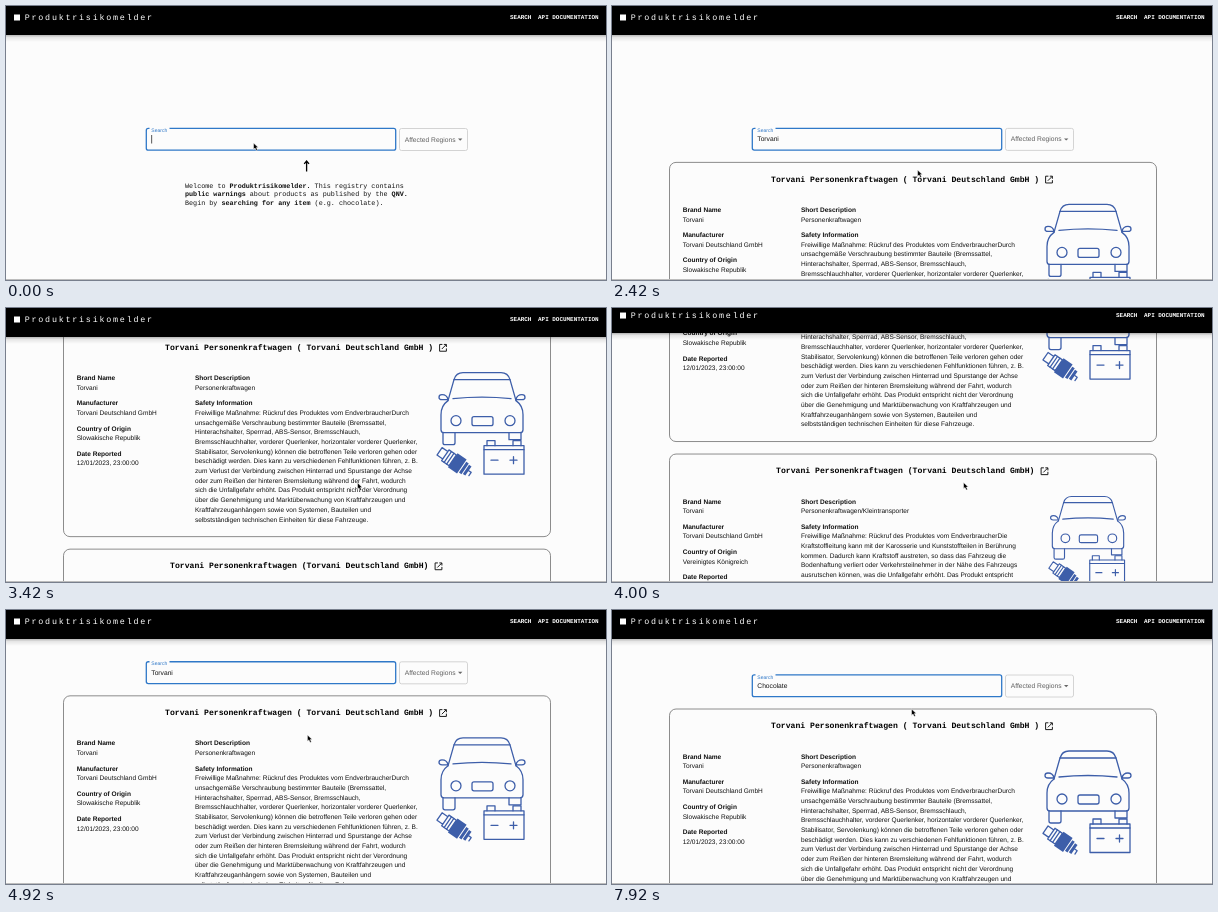
These frames come from a looping animation (600x274 px, 8 s). An HTML page with a canvas:

```html
<!DOCTYPE html>
<html lang="en">
<head>
<meta charset="utf-8">
<title>Produktrisikomelder</title>
<style>
html, body { margin: 0; width: 100%; height: 100%; overflow: hidden; background: #fcfcfc; }
canvas { display: block; width: 600px; height: 274px; }
</style>
</head>
<body>
<canvas id="stage"></canvas>
<script>
const W = 600, H = 274, LOOP = 8000;
const SANS = '"Liberation Sans", Arial, sans-serif';
const MONO = '"Liberation Mono", "Courier New", monospace';
const BLUE = '#2f78c8', INK = '#3d5ea9', BG = '#fcfcfc';
const BRAND = 'Torvani', SITE = 'Produktrisikomelder';
const RESULTS_AT = 2400, MAX_SCROLL = 225;

const canvas = document.getElementById('stage');
const dpr = window.devicePixelRatio || 1;
canvas.width = W * dpr;
canvas.height = H * dpr;
const ctx = canvas.getContext('2d');

const cards = [
  {
    title: `${BRAND} Personenkraftwagen ( ${BRAND} Deutschland GmbH )`,
    x: 159, iconX: 432.5, carScale: 1, carY: 42,
    kind: 'Personenkraftwagen', country: 'Slowakische Republik',
    lines: [
      'Freiwillige Maßnahme: Rückruf des Produktes vom EndverbraucherDurch',
      'unsachgemäße Verschraubung bestimmter Bauteile (Bremssattel,',
      'Hinterachshalter, Sperrrad, ABS-Sensor, Bremsschlauch,',
      'Bremsschlauchhalter, vorderer Querlenker, horizontaler vorderer Querlenker,',
      'Stabilisator, Servolenkung) können die betroffenen Teile verloren gehen oder',
      'beschädigt werden. Dies kann zu verschiedenen Fehlfunktionen führen, z. B.',
      'zum Verlust der Verbindung zwischen Hinterrad und Spurstange der Achse',
      'oder zum Reißen der hinteren Bremsleitung während der Fahrt, wodurch',
      'sich die Unfallgefahr erhöht. Das Produkt entspricht nicht der Verordnung',
      'über die Genehmigung und Marktüberwachung von Kraftfahrzeugen und',
      'Kraftfahrzeuganhängern sowie von Systemen, Bauteilen und',
      'selbstständigen technischen Einheiten für diese Fahrzeuge.'
    ]
  },
  {
    title: `${BRAND} Personenkraftwagen (${BRAND} Deutschland GmbH)`,
    x: 164, iconX: 428, carScale: 0.87, carY: 42.5,
    kind: 'Personenkraftwagen/Kleintransporter', country: 'Vereinigtes Königreich',
    lines: [
      'Freiwillige Maßnahme: Rückruf des Produktes vom EndverbraucherDie',
      'Kraftstoffleitung kann mit der Karosserie und Kunststoffteilen in Berührung',
      'kommen. Dadurch kann Kraftstoff austreten, so dass das Fahrzeug die',
      'Bodenhaftung verliert oder Verkehrsteilnehmer in der Nähe des Fahrzeugs',
      'ausrutschen können, was die Unfallgefahr erhöht. Das Produkt entspricht'
    ]
  }
];

// [time, value of the search field]
const typing = [[-80, '']];
[[1000, 1], [1330, 2], [1420, 4], [1500, 5], [1670, 7]]
  .forEach(([t, n]) => typing.push([t, BRAND.slice(0, n)]));
for (let n = 6; n >= 0; n--) typing.push([5410 + (6 - n) * 84, BRAND.slice(0, n)]);
[6300, 6620, 6780, 6900, 7000, 7100, 7200, 7300, 7400]
  .forEach((t, i) => typing.push([t, 'Chocolate'.slice(0, i + 1)]));

// [time, page offset]
const scroll = [[2420, 0], [2900, 57.5], [3230, 57.5], [3420, 133.5], [3600, 200],
  [3750, 228], [3850, 232], [4000, 229], [4120, 225], [4250, 218], [4500, 186.5],
  [4750, 110], [4950, 64], [5080, 57.5]];

// visible stretches of the pointer: [time, x, y]
const pointer = [
  [[0, 248, 137], [950, 248, 137]],
  [[2000, 248, 137], [2170, 292, 158], [2420, 306, 164], [2800, 330, 170], [3200, 352, 175],
   [4700, 352, 174], [5150, 250, 74], [5400, 248, 76]],
  [[7660, 248, 76], [7840, 294, 96], [7920, 300, 99], [8000, 300, 99]]
];

function track(keys, t, i = 1) {
  if (t <= keys[0][0]) return keys[0][i];
  for (let k = 1; k < keys.length; k++) {
    const a = keys[k - 1], b = keys[k];
    if (t < b[0]) return a[i] + (b[i] - a[i]) * (t - a[0]) / (b[0] - a[0]);
  }
  return keys[keys.length - 1][i];
}

function text(str, x, y, size, { font = SANS, bold = false, color = '#111', gap = 0 } = {}) {
  ctx.font = `${bold ? 'bold ' : ''}${size}px ${font}`;
  ctx.letterSpacing = gap + 'px';
  ctx.fillStyle = color;
  ctx.fillText(str, x, y);
  return x + ctx.measureText(str).width;
}

function box(x, y, w, h, r, color, width) {
  ctx.beginPath();
  ctx.roundRect(x, y, w, h, r);
  ctx.strokeStyle = color;
  ctx.lineWidth = width;
  ctx.stroke();
}

function shape(d, { fill, stroke, width = 1 }) {
  const p = new Path2D(d);
  if (fill) { ctx.fillStyle = fill; ctx.fill(p); }
  if (stroke) { ctx.strokeStyle = stroke; ctx.lineWidth = width; ctx.stroke(p); }
}

function header(y) {
  const shade = ctx.createLinearGradient(0, y + 29, 0, y + 36);
  shade.addColorStop(0, 'rgba(0,0,0,.28)');
  shade.addColorStop(0.35, 'rgba(0,0,0,.09)');
  shade.addColorStop(1, 'rgba(0,0,0,0)');
  ctx.fillStyle = shade;
  ctx.fillRect(0, y + 29, W, 7);
  ctx.fillStyle = '#000';
  ctx.fillRect(0, 0, W, y + 29);
  ctx.fillStyle = '#fff';
  ctx.fillRect(8, y + 8.5, 6, 6);
  text(SITE, 18.7, y + 14, 8.4, { font: MONO, color: '#fff', gap: 1.77 });
  const menu = { font: MONO, bold: true, color: '#fff' };
  text('SEARCH', 504, y + 13.4, 5.95, menu);
  text('API DOCUMENTATION', 532, y + 13.4, 5.95, menu);
}

function search(y, value, caret) {
  box(140.3, y + 122.4, 249.4, 21.8, 2, BLUE, 1.3);
  ctx.fillStyle = BG;
  ctx.fillRect(143.5, y + 121, 20, 3);
  text('Search', 145.3, y + 126, 5.05, { color: BLUE });
  const end = text(value, 145.3, y + 135.6, 6.7);
  if (caret) {
    ctx.fillStyle = '#111';
    ctx.fillRect(end + 0.1, y + 129, 0.7, 8.5);
  }
  box(393.5, y + 122.5, 68, 22, 2, '#c9c9c9', 0.8);
  text('Affected Regions', 398.8, y + 135.6, 6.7, { color: '#5f5f5f' });
  shape(`M452 ${y + 132.5}h4.4l-2.2 2.2z`, { fill: '#666' });
}

function welcome() {
  shape('M300.6 165.5V155.2M298.2 157.8L300.6 155L303 157.8', { stroke: '#000', width: 1.3 });
  // odd pieces are bold
  const rows = [
    ['Welcome to ', SITE + '.', ' This registry contains'],
    ['', 'public warnings', ' about products as published by the ', 'QNV.'],
    ['Begin by ', 'searching for any item', ' (e.g. chocolate).']
  ];
  rows.forEach((row, r) => {
    let x = 179;
    row.forEach((part, i) => {
      x = text(part, x, 181.6 + r * 8.7, 6.76, { font: MONO, bold: i % 2 === 1 });
    });
  });
}

function car(top, scale) {
  ctx.save();
  ctx.translate(476, top);
  ctx.scale(scale, scale);
  ctx.translate(-476, -42);
  ctx.lineJoin = ctx.lineCap = 'round';
  const line = { stroke: INK, width: 1.3 };
  // roof and windscreen
  shape('M442 70L448 49Q450 42 457 42H495Q502 42 504 49L510 70', line);
  shape('M448 49H504M447 68Q476 65 505 68', line);
  // mirrors
  shape('M442 69H436Q433 69 433 66.500Q433 64 436 64Q441 64 442 69M510 69H516Q519 69 519 66.500Q519 64 516 64Q511 64 510 69', line);
  // body, lights, grille
  shape('M442 70Q435 75 435 84V99Q435 102 438 102H514Q517 102 517 99V84Q517 75 510 70', line);
  shape('M455 90a5 5 0 1 1-10 0a5 5 0 1 1 10 0M509 90a5 5 0 1 1-10 0a5 5 0 1 1 10 0', line);
  shape('M468 86H485Q487 86 487 88V93Q487 95 485 95H468Q466 95 466 93V88Q466 86 468 86', line);
  shape('M437 102V112Q437 114 439 114H447Q449 114 449 112V102', line);
  shape('M503 102V109H515V102', line);
  // battery
  shape('M478 115H518V143.500H478Z', { fill: BG, ...line });
  shape('M481 115V110H489V115M507 115V110H515V115M478 119H518', line);
  shape('M485 129.500H492M504 129.500H511M507.500 126V133', line);
  // spark plug
  ctx.translate(449.5, 131);
  ctx.rotate(0.6);
  shape('M-19 -4H-12V5H-19ZM-12 -6H-3V7H-12Z', line);
  shape('M-3 -8H8V9H-3ZM9 -6H12V7H9ZM13 -5H16V6H13Z', { fill: INK });
  shape('M-9 -6V7M-6 -6V7M16 0H19V4', line);
  ctx.restore();
}

function openIcon(x, y) {
  shape(`M${x + 3.4} ${y + 0.6}H${x + 0.6}V${y + 7.4}H${x + 7.4}V${y + 4.6}` +
    `M${x + 4.8} ${y + 0.6}H${x + 7.4}V${y + 3.2}M${x + 7.2} ${y + 0.8}L${x + 2.8} ${y + 5.2}`,
    { stroke: '#111', width: 0.95 });
}

function card(c, y) {
  box(57.5, y, 487, 206, 6.5, '#6f6f6f', 0.8);
  text(c.title, c.x, y + 19.2, 8.15, { font: MONO, bold: true, color: '#000' });
  openIcon(c.iconX + 0.5, y + 13.2);
  const fields = [
    ['Brand Name', BRAND], ['Manufacturer', BRAND + ' Deutschland GmbH'],
    ['Country of Origin', c.country], ['Date Reported', '12/01/2023, 23:00:00']
  ];
  fields.forEach(([name, value], i) => {
    text(name, 70.7, y + 49.5 + i * 25.2, 6.55, { bold: true });
    text(value, 70.7, y + 59.2 + i * 25.2, 6.55);
  });
  text('Short Description', 189, y + 49.5, 6.55, { bold: true });
  text(c.kind, 189, y + 59.2, 6.55);
  text('Safety Information', 189, y + 74.7, 6.55, { bold: true });
  c.lines.forEach((l, i) => text(l, 189, y + 84.4 + i * 9.68, 6.55));
  car(y + c.carY, c.carScale);
}

function cursor(t) {
  const run = pointer.find(k => t >= k[0][0] && t < k[k.length - 1][0]);
  if (!run) return;
  ctx.save();
  ctx.translate(track(run, t, 1), track(run, t, 2));
  shape('M-.5 0V6.400L1 5L2.200 7.600L3.500 7L2.400 4.600H4.300Z',
    { fill: '#000', stroke: '#fff', width: 0.5 });
  ctx.restore();
}

function draw(t) {
  ctx.setTransform(dpr, 0, 0, dpr, 0, 0);
  ctx.textRendering = 'geometricPrecision';
  ctx.lineCap = 'butt';
  ctx.lineJoin = 'miter';
  ctx.fillStyle = BG;
  ctx.fillRect(0, 0, W, H);

  const offset = track(scroll, t);
  const [typedAt, value] = typing.filter(k => k[0] <= t).pop();
  const focused = t < RESULTS_AT || t > 5200;
  search(-offset, value, focused && (t - typedAt) % 1000 < 500);
  if (t < 1080) welcome();
  if (t >= RESULTS_AT) cards.forEach((c, i) => card(c, 156.5 + i * 218.5 - offset));
  header(Math.min(0, MAX_SCROLL - offset));
  ctx.fillStyle = '#bdbdbd';
  ctx.fillRect(0, 273, W, 1);
  cursor(t);
}

function frame(now) {
  draw(now % LOOP);
  requestAnimationFrame(frame);
}
requestAnimationFrame(frame);
</script>
</body>
</html>
```
